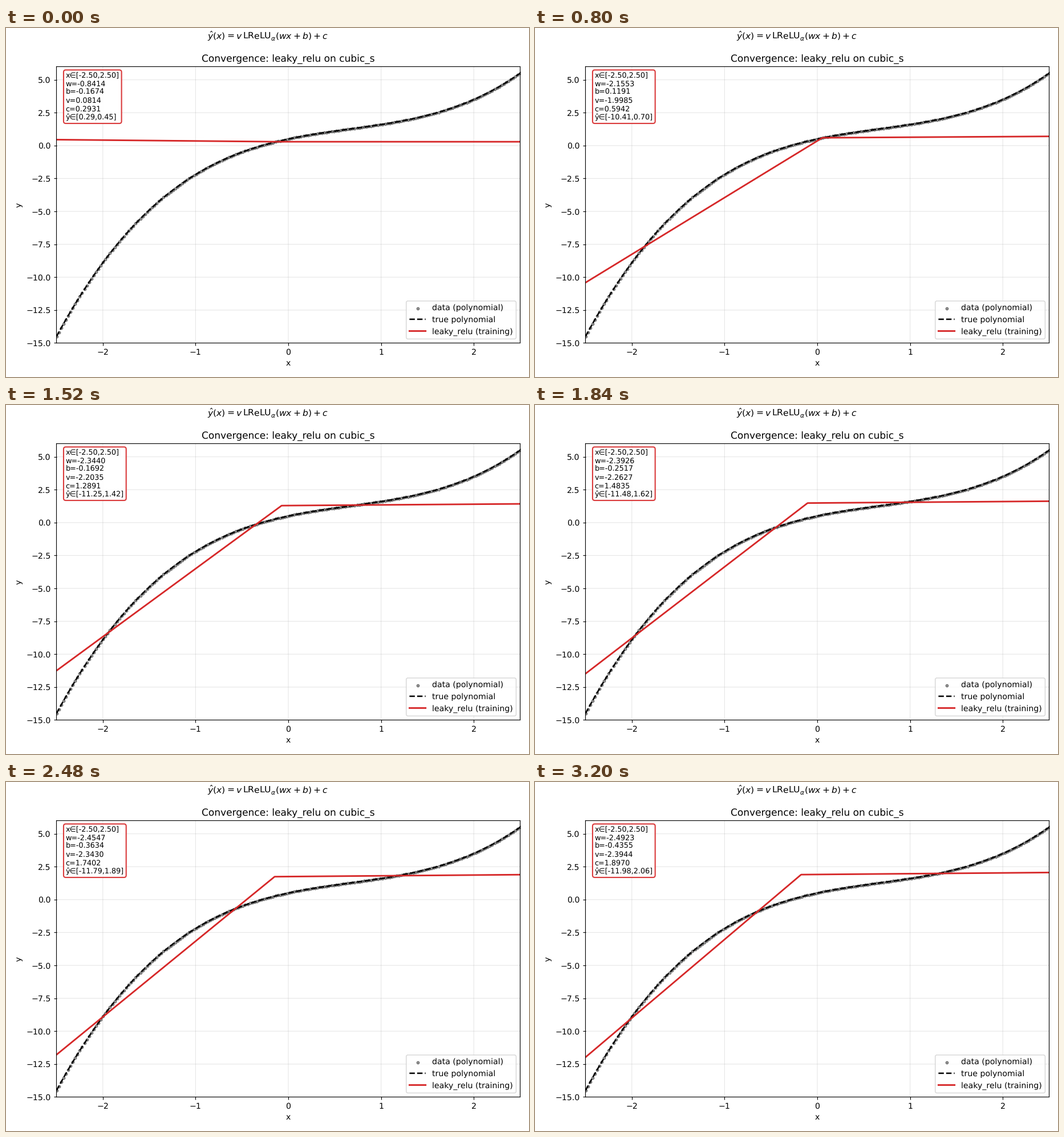
Write a matplotlib script that moves like this. It is 917 px wide and 611 px high and loops after 3.28 s.

```python
import numpy as np
import matplotlib.pyplot as plt
from matplotlib.animation import FuncAnimation

W, H, DPI = 917, 611, 101.875
FRAMES, INTERVAL = 41, 80
ALPHA, LR, STEPS = 0.01, 0.01, 5
START = (-0.8414, -0.1674, 0.0814, 0.2931)  # w, b, v, c
RED = "tab:red"


def cubic(x):
    return 0.5 + 1.5 * x - 0.8 * x**2 + 0.4 * x**3


def predict(p, x):
    w, b, v, c = p
    z = w * x + b
    return v * np.where(z > 0, z, ALPHA * z) + c


def gradient(p, x, y):
    """Gradient of the mean squared error."""
    w, b, v, _ = p
    z = w * x + b
    slope = np.where(z > 0, 1, ALPHA)
    r = 2 * (predict(p, x) - y)
    return np.mean([r * v * slope * x, r * v * slope, r * slope * z, r], axis=1)


def train(x, y):
    """Parameters at every frame, a few descent steps apart."""
    p = np.array(START)
    states = [p]
    for _ in range(FRAMES - 1):
        for _ in range(STEPS):
            p = p - LR * gradient(p, x, y)
        states.append(p)
    return states


xs = np.linspace(-2.5, 2.5, 200)
xline = np.linspace(-2.5, 2.5, 1000)
states = train(xs, cubic(xs))

plt.rcParams.update({"font.family": "DejaVu Sans", "text.hinting": "none",
                     "path.snap": False})
# The tiny margin keeps the pixel size from truncating down.
fig = plt.figure(figsize=((W + 1e-6) / DPI, (H + 1e-6) / DPI), dpi=DPI)
ax = fig.add_axes([88.5 / W, 1 - 551.5 / H, 813 / W, 483.9 / H])
fig.suptitle(r"$\hat{y}(x) = v\,\mathrm{LReLU}_{\alpha}(wx+b)+c$",
             fontsize=11, y=0.995)
ax.set_title("Convergence: leaky_relu on cubic_s")
ax.set(xlim=(-2.5, 2.5), ylim=(-15, 6), xlabel="x", ylabel="y")
ax.grid(True, alpha=0.3)

ax.scatter(xs, cubic(xs), s=10, color="black", alpha=0.4,
           label="data (polynomial)")
ax.plot(xline, cubic(xline), "k--", lw=1.8, label="true polynomial")
fit, = ax.plot(xline, predict(START, xline), color=RED, lw=2,
               label="leaky_relu (training)")
ax.legend(loc="lower right")
info = ax.text(0.02, 0.98, "", transform=ax.transAxes, fontsize=9,
               ha="left", va="top",
               bbox=dict(boxstyle="round,pad=0.3", facecolor="white",
                         edgecolor=RED, linewidth=1.5, alpha=0.9))


def update(i):
    p = states[i]
    yhat = predict(p, xline)
    fit.set_ydata(yhat)
    lines = [f"x∈[{xs[0]:.2f},{xs[-1]:.2f}]"]
    lines += [f"{name}={value:.4f}" for name, value in zip("wbvc", p)]
    lines.append(f"ŷ∈[{yhat.min():.2f},{yhat.max():.2f}]")
    info.set_text("\n".join(lines))
    return fit, info


anim = FuncAnimation(fig, update, frames=FRAMES, interval=INTERVAL,
                     repeat=True, repeat_delay=0, blit=False)
plt.show()
```
